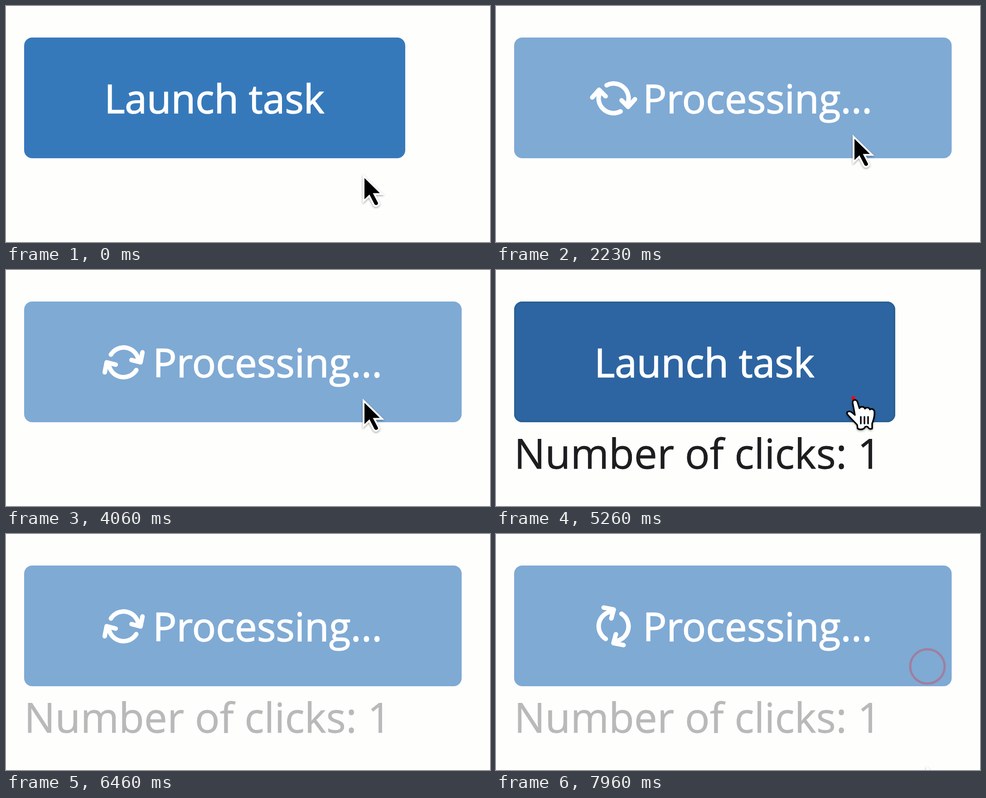
An HTML page for the animation above (8000 ms loop, 1068 px wide and 524 px high).

```html
<!DOCTYPE html>
<html lang="en">
<head>
<meta charset="utf-8">
<title>Task button</title>
<style>
  html, body { margin: 0; width: 100%; height: 100%; overflow: hidden; background: #fefefd; }
  svg { display: block; width: 1068px; height: 524px; }
  text { font-family: "Open Sans", "Noto Sans", sans-serif; white-space: pre; }
  .label { font-size: 87.3px; fill: #fff; stroke: #fff; stroke-width: 1.6; }
  .count { font-size: 91px; fill: #1d1d20; stroke: #1d1d20; stroke-width: .8; }
  .ring { fill: none; stroke: #f00; stroke-width: 5; }
  #icon { fill: none; stroke: #fff; stroke-width: 10; stroke-linecap: round; stroke-linejoin: round; }
  #arrow, #hand { filter: drop-shadow(0 2px 2px rgba(0, 0, 0, .35)); }
  #arrow path { stroke: #fff; stroke-width: 8; stroke-miterlimit: 4; paint-order: stroke; }
  #hand path { fill: #fff; stroke: #000; stroke-width: 3.4; stroke-linejoin: round; stroke-linecap: round; }
</style>
</head>
<body>
<svg viewBox="0 0 1068 524">
  <defs>
    <g id="half">
      <path d="M-29.5 14.5A33 33 0 0 1 16 -29"/>
      <path d="M3.5 -47L20 -31.5L5 -17.5"/>
    </g>
  </defs>
  <rect id="button" x="40" y="70" height="268" rx="18"/>
  <rect id="border" x="42" y="72" width="837" height="264" rx="16" fill="none" stroke="#296194" stroke-width="4"/>
  <text id="launch" class="label" x="217" y="238">Launch task</text>
  <g id="busy">
    <g id="icon"><use href="#half"/><use href="#half" transform="rotate(180)"/></g>
    <text class="label" x="324" y="238">Processing...</text>
  </g>
  <text id="count" class="count" x="40" y="441">Number of clicks: 1</text>
  <g id="rings"></g>
  <g id="arrow">
    <path d="M3 10V57L14 46.5L25 68Q27 71 30.500 69.500Q34 67.500 32.500 64.500L21.500 43.500H37Z"/>
  </g>
  <g id="hand">
    <g transform="translate(1 1)">
      <path d="M-2 9C-3 1 7 0 9 8L13 21C15 16 24 17 25 22C28 18 35 19 36 24C39 21 46 23 46 29C47 41 43 49 41 55V66Q35 69 31 62Q26 60 23 66Q15 70 9 66L8 58C1 50 -8 42 -14 34C-16 28 -9 26 -4 30L3 36Z"/>
      <path d="M16 40V55M24 40V55M32 40V55"/>
    </g>
  </g>
</svg>
<script>
  const LOOP = 8000;
  const NORMAL = [54, 121, 187], HOVER = [45, 101, 162], DISABLED = [127, 170, 212];
  const HOVER_AT = 170, START_1 = 1020, DONE_1 = 4070, START_2 = 5415;
  const RING_LIFE = 1200, RING_RADIUS = 45;

  const clicks = [[325, 787, 303], [845, 788.5, 284.5], [5215, 788.5, 284.5], [6947, 952, 294]];
  // time, x, y of the pointer's hot spot
  const pointerPath = [
    [30, 788, 372], [310, 787, 303], [480, 787, 303], [800, 788, 285],
    [5780, 788, 285], [5930, 795, 302], [6250, 842, 528], [6480, 915, 528],
    [6860, 952, 296], [7240, 952, 296], [7700, 950, 514]
  ];

  const $ = id => document.getElementById(id);
  const clamp = v => Math.max(0, Math.min(1, v));
  const progress = (t, start, length) => clamp((t - start) / length);
  const smooth = p => p * p * (3 - 2 * p);
  const mix = (a, b, p) => a + (b - a) * p;
  const show = (id, visible) => $(id).setAttribute('display', visible ? 'inline' : 'none');

  const rings = clicks.map(([, x, y]) => {
    const ring = document.createElementNS('http://www.w3.org/2000/svg', 'circle');
    ring.setAttribute('class', 'ring');
    ring.setAttribute('cx', x);
    ring.setAttribute('cy', y);
    return $('rings').appendChild(ring);
  });

  function pointerAt(t) {
    const next = pointerPath.findIndex(key => key[0] > t);
    if (next === 0) return pointerPath[0].slice(1);
    if (next < 0) return pointerPath[pointerPath.length - 1].slice(1);
    const [t0, x0, y0] = pointerPath[next - 1], [t1, x1, y1] = pointerPath[next];
    const p = smooth(progress(t, t0, t1 - t0));
    return [mix(x0, x1, p), mix(y0, y1, p)];
  }

  function buttonColor(t) {
    const fades = [[HOVER_AT, NORMAL, HOVER], [START_1, HOVER, DISABLED],
                   [DONE_1, DISABLED, HOVER], [START_2, HOVER, DISABLED]];
    const [start, from, to] = fades.filter(f => f[0] <= t).pop() || [0, NORMAL, NORMAL];
    const p = smooth(progress(t, start, 130));
    return `rgb(${from.map((c, i) => Math.round(mix(c, to[i], p)))})`;
  }

  // Two turns of phase: each task starts its own spin, one turn every 2 s.
  const spinAngle = t => t < START_2 ? 75.6 + 0.18 * (t - 1160) : 142.6 + 0.18 * (t - 5930);

  function draw(t) {
    const busy = (t >= START_1 && t < DONE_1) || t >= START_2;
    const hovering = !busy && t >= HOVER_AT;

    $('button').setAttribute('width', busy ? 965.5 : 841);
    $('button').setAttribute('fill', buttonColor(t));
    show('border', hovering);
    show('launch', !busy);
    show('busy', busy);
    $('icon').setAttribute('transform', `translate(259.5 205) rotate(${spinAngle(t)})`);

    show('count', t >= DONE_1);
    $('count').setAttribute('opacity', mix(1, 0.3, smooth(progress(t, START_2 + 480, 250))));

    rings.forEach((ring, i) => {
      const age = (t - clicks[i][0]) / RING_LIFE;
      const alive = age > 0 && age < 1;
      ring.setAttribute('r', alive ? RING_RADIUS * age : 0);
      ring.setAttribute('opacity', alive ? 1 - age ** 1.75 : 0);
    });

    const place = `translate(${pointerAt(t).join(' ')})`;
    for (const id of ['arrow', 'hand']) $(id).setAttribute('transform', place);
    show('arrow', !hovering);
    show('hand', hovering);
  }

  let begin;
  function tick(now) {
    begin ??= now;
    draw((now - begin) % LOOP);
    requestAnimationFrame(tick);
  }
  draw(0);
  requestAnimationFrame(tick);
</script>
</body>
</html>
```
